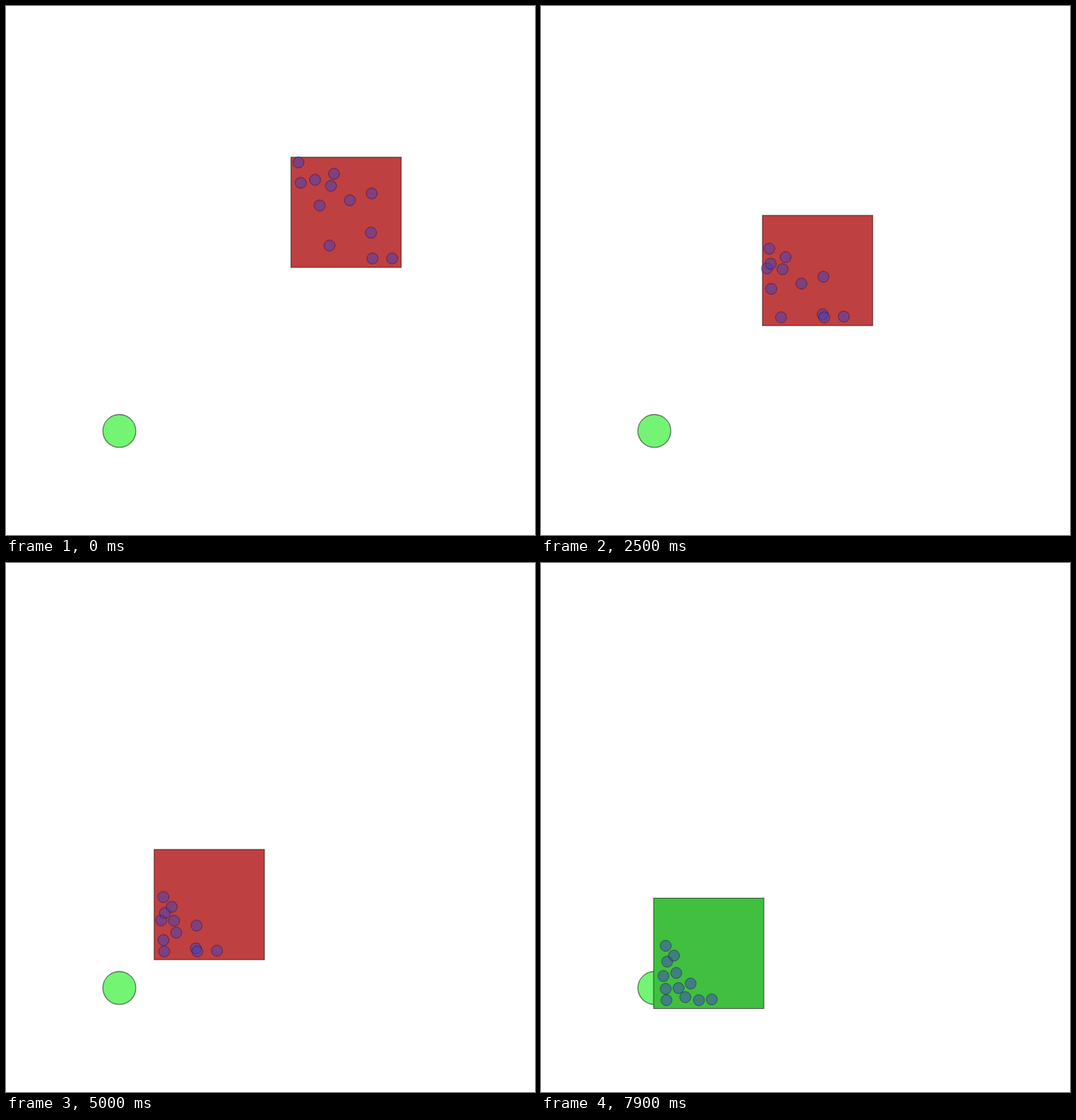
Recreate the animation shown at these times as an HTML page. Size 700 by 700 pixels, loop 8 s.

```html
<!DOCTYPE html>
<html lang="en">
<head>
<meta charset="utf-8">
<title>Swarm pushing a box</title>
<style>
  html, body { margin: 0; width: 100%; height: 100%; overflow: hidden; background: #fff; }
  svg { display: block; width: 100vw; height: 100vh; }
  #goal { fill: #73f473; stroke: rgba(0, 0, 0, .5); stroke-width: 1.3; }
  #box { stroke: rgba(0, 0, 0, .6); }
  #dots circle { fill: rgba(64, 64, 191, .5); stroke: rgba(20, 10, 50, .45); }
</style>
</head>
<body>
<svg viewBox="0 0 700 700">
  <circle id="goal" cx="150" cy="562.3" r="21.8"/>
  <rect id="box" width="146" height="146"/>
  <g id="dots"></g>
</svg>
<script>
const LOOP = 8000, STEP = 100, REACHED = 5800;
const SPEED = 0.0486, RAMP = 230; // px per ms along each axis, ms to get going
const SLACK = 7, SLIDE = 0.15, RADIUS = 7.3;

const boxPath = [
  { t: 0, x: 377, y: 200 }, { t: 900, x: 356, y: 219 },
  { t: 1500, x: 334, y: 238 }, { t: 2500, x: 293, y: 277 },
  { t: 4000, x: 238, y: 335 }, { t: 5000, x: 196, y: 379 },
  { t: 6100, x: 159, y: 420 }, { t: 7900, x: 149, y: 443.5 }
];

// Start on the stage, then the resting place inside the box
const swarm = [
  [387, 207, 16, 63], [390, 234, 13, 103], [409, 230, 18, 84],
  [434, 222, 27, 76], [430, 238, 30, 99], [415, 264, 16, 120],
  [455, 257, 33, 119], [484, 248, 49, 113], [483, 300, 42, 131],
  [428, 317, 17, 135], [485, 334, 60, 135], [511, 334, 77, 134]
];

const clamp01 = v => Math.max(0, Math.min(1, v));
const mix = (a, b, k) => a + (b - a) * k;

function boxAt(t) {
  const next = Math.max(1, boxPath.findIndex(p => p.t >= t));
  const a = boxPath[next - 1], b = boxPath[next];
  const k = (t - a.t) / (b.t - a.t);
  return { x: mix(a.x, b.x, k), y: mix(a.y, b.y, k) };
}

// Each dot heads diagonally for the goal until the wall or its neighbours stop it.
function dotAt([startX, startY, restX, restY], t, corner) {
  const drift = SPEED * (t - RAMP * (1 - Math.exp(-t / RAMP)));
  const squeeze = SLACK * (1 - clamp01((t - 4000) / 2100));
  const freeX = startX - drift;
  const x = Math.max(freeX, corner.x + restX - squeeze);
  const freeY = startY + drift + SLIDE * (x - freeX);
  return { x, y: Math.min(freeY, corner.y + restY) };
}

const box = document.getElementById("box");
const group = document.getElementById("dots");
const circles = swarm.map(() => {
  const circle = document.createElementNS("http://www.w3.org/2000/svg", "circle");
  circle.setAttribute("r", RADIUS);
  return group.appendChild(circle);
});

function draw(now) {
  const t = Math.floor((now % LOOP) / STEP) * STEP;
  const corner = boxAt(t);
  box.setAttribute("x", corner.x);
  box.setAttribute("y", corner.y);
  box.setAttribute("fill", t < REACHED ? "#bf4040" : "#40bf40");
  circles.forEach((circle, i) => {
    const { x, y } = dotAt(swarm[i], t, corner);
    circle.setAttribute("cx", x);
    circle.setAttribute("cy", y);
  });
}

const begin = performance.now();
function tick() {
  draw(performance.now() - begin);
  requestAnimationFrame(tick);
}
tick();
</script>
</body>
</html>
```
